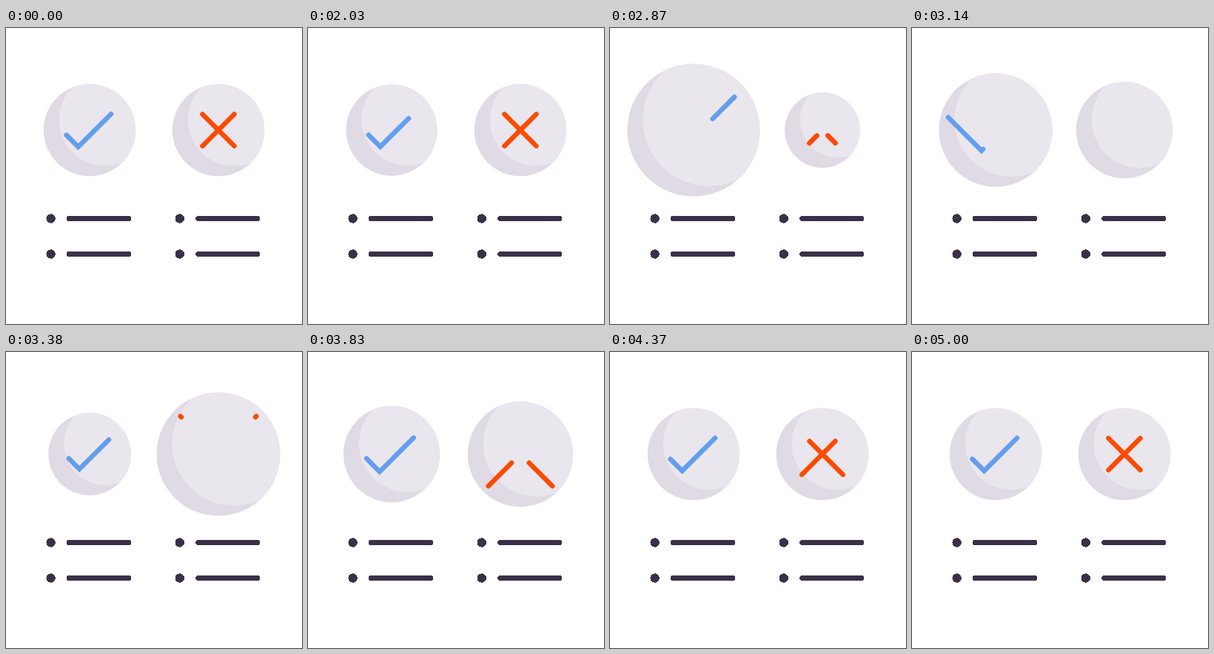
These frames come from a looping animation (400x400 px, 5.03 s). An HTML page:

```html
<!DOCTYPE html>
<html lang="en">
<head>
<meta charset="utf-8">
<title>Pros and cons</title>
<style>
  html, body { margin: 0; width: 100%; height: 100%; overflow: hidden; background: #fff; }
  svg { display: block; width: 100%; height: 100%; }
</style>
</head>
<body>
<svg id="stage" viewBox="0 0 400 400"></svg>
<script>
const LOOP = 5030, HOLD = 2030, STEP = 30;
const RADIUS = 62.2, ERASE_TIME = 310, REDRAW = 700;
const INK = '#3a3149';
const stage = document.getElementById('stage');

function add(parent, tag, attrs) {
  const el = document.createElementNS('http://www.w3.org/2000/svg', tag);
  for (const key in attrs) el.setAttribute(key, attrs[key]);
  return parent.appendChild(el);
}

// Monotone cubic curve through [time, value] keys, flat at every extreme.
function track(...keys) {
  const slope = i => (keys[i + 1][1] - keys[i][1]) / (keys[i + 1][0] - keys[i][0]);
  const tangents = keys.map((_, i) => {
    if (i === 0 || i === keys.length - 1) return 0;
    const before = slope(i - 1), after = slope(i);
    return before * after <= 0 ? 0 : 2 * before * after / (before + after);
  });
  return t => {
    if (t <= keys[0][0]) return keys[0][1];
    const i = keys.findIndex(key => key[0] > t) - 1;
    if (i < 0) return keys[keys.length - 1][1];
    const [t0, v0] = keys[i], [t1, v1] = keys[i + 1];
    const h = t1 - t0, u = (t - t0) / h, w = 1 - u;
    return v0 * (1 + 2 * u) * w * w + h * tangents[i] * u * w * w
         + v1 * u * u * (3 - 2 * u) - h * tangents[i + 1] * u * u * w;
  };
}

// Both badges share one bounce; times count from the badge's own start.
const swell = track([0, 0], [250, -0.21], [730, 0.38], [940, 0.45], [1410, -0.11], [1930, 0.065], [2400, 0]);
const tail = track([REDRAW, -1.8], [870, -1.31], [1180, 0.48], [1380, -1], [1720, -0.81], [1860, -1]);
const head = track([REDRAW, -1.8], [870, -0.63], [1180, 1.76], [1380, 1], [1720, 1.29], [1860, 1]);

// Strokes run from -1 to 1; values outside prolong the end segments.
function crossPath(from, to, scale) {
  const p = from * 21.5 * scale, q = to * 21.5 * scale;
  return `M${-p} ${p}L${-q} ${q}M${p} ${p}L${q} ${q}`;
}

function checkPath(from, to, scale) {
  const bend = 44.4, half = 30.2, top = -21.8;
  const at = d => `${(29 - d) * scale} ${(top + bend - Math.abs(d - bend)) * scale}`;
  const p = (from + 1) * half, q = (to + 1) * half;
  const corner = p < bend && q > bend ? 'L' + at(bend) : '';
  return `M${at(p)}${corner}L${at(q)}`;
}

const badges = [
  { x: 113, start: 2000, gain: 1, color: '#629eed', path: checkPath },
  { x: 287, start: 2650, gain: 0.9, color: '#fa4b00', path: crossPath }
];

badges.forEach((badge, i) => {
  const group = add(stage, 'g', { transform: `translate(${badge.x} 138)` });
  const clip = add(group, 'clipPath', { id: 'disc' + i });
  badge.discs = [
    add(clip, 'circle', {}),
    add(group, 'circle', { fill: '#e0dae4' }),
    add(add(group, 'g', { 'clip-path': `url(#disc${i})` }), 'circle',
      { cx: 21, cy: -14, fill: '#eae6ed' })
  ];
  badge.mark = add(group, 'path', {
    fill: 'none', stroke: badge.color, 'stroke-width': 6.5, 'stroke-linecap': 'round'
  });
});

const list = add(stage, 'g', {
  fill: INK, stroke: INK, 'stroke-width': 7, 'stroke-linecap': 'round', 'shape-rendering': 'crispEdges'
});
for (const x of [60.6, 234.8]) {
  for (const y of [257.5, 305.5]) {
    add(list, 'circle', { cx: x, cy: y, r: 6.2, stroke: 'none' });
    add(list, 'path', { d: `M${x + 24.8} ${y}h80.2` });
  }
}

function drawBadge({ start, gain, path, discs, mark }, time) {
  const t = Math.max(0, time - start);
  const scale = 1 + gain * swell(t);
  const redrawing = t >= REDRAW;
  const from = redrawing ? tail(t) : 2 * t / ERASE_TIME - 1;
  const to = redrawing ? head(t) : 1;
  discs.forEach(disc => disc.setAttribute('r', RADIUS * scale));
  mark.setAttribute('d', from < to ? path(from, to, scale) : '');
}

function draw(time) {
  const t = time < HOLD ? 0 : HOLD + Math.floor((time - HOLD) / STEP) * STEP;
  badges.forEach(badge => drawBadge(badge, t));
}

const begin = performance.now();
function tick() {
  draw((performance.now() - begin) % LOOP);
  requestAnimationFrame(tick);
}
tick();
</script>
</body>
</html>
```
